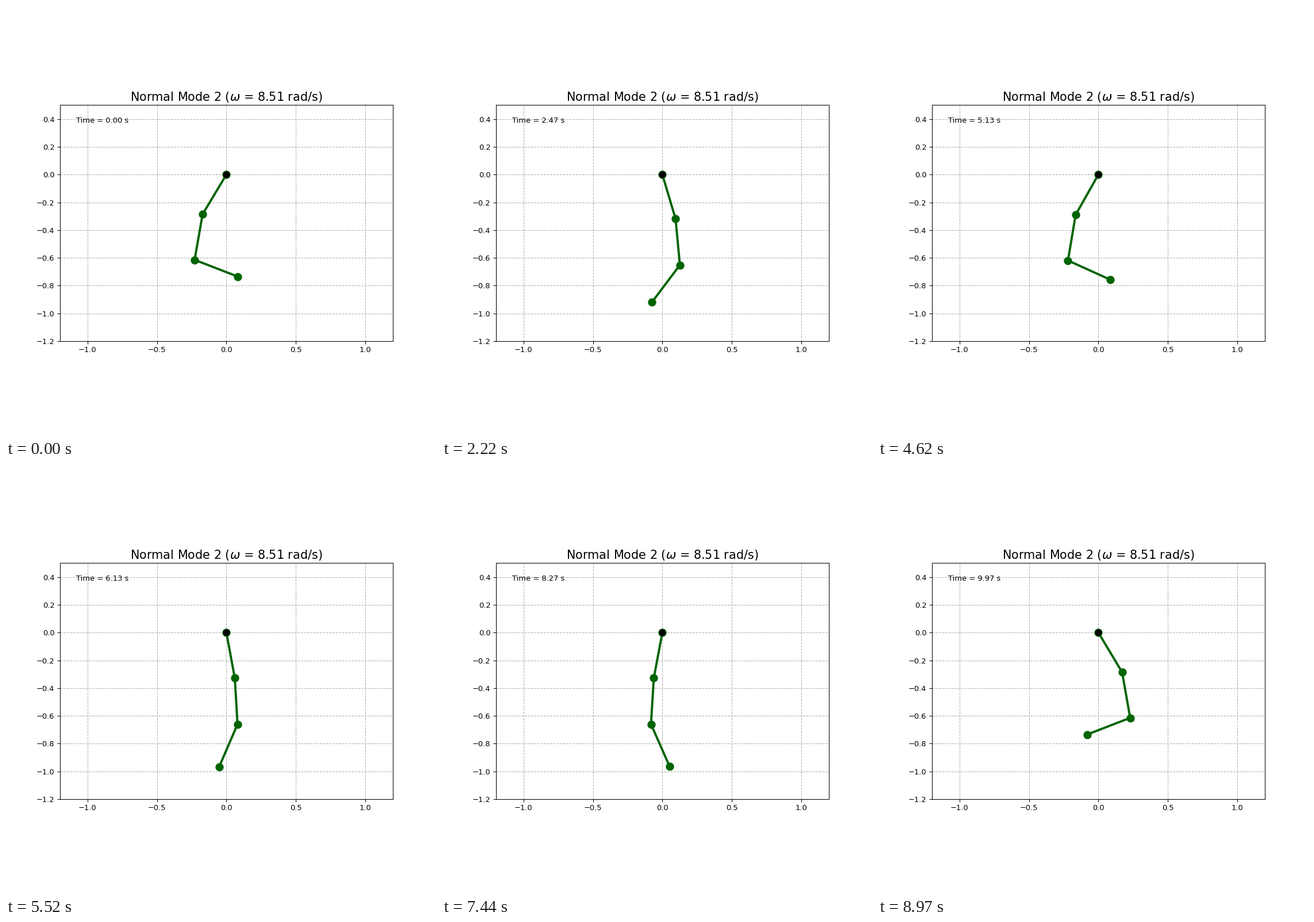
A matplotlib script for the animation above (9 s loop, 748x748 px).

```python
import numpy as np
import matplotlib.pyplot as plt
from matplotlib.animation import FuncAnimation

FPS = 30
FRAMES = 300
LENGTH = 1 / 3
OMEGA = 8.508
AMPLITUDE = np.array([-0.5393, -0.1743, 1.2018])

fig, ax = plt.subplots(figsize=(8, 8), dpi=93.5)
ax.set_aspect("equal")
ax.set_xlim(-1.2, 1.2)
ax.set_ylim(-1.2, 0.5)
ax.set_xticks(np.arange(-1, 1.1, 0.5))
ax.set_yticks(np.arange(-6, 3) * 0.2)
ax.grid(True, linestyle="--")
ax.set_title(rf"Normal Mode 2 ($\omega$ = {OMEGA:.2f} rad/s)", fontsize=16)

chain, = ax.plot([], [], "o-", color="darkgreen", lw=3, markersize=10)
ax.plot(0, 0, "ko", markersize=8)
clock = ax.text(0.05, 0.95, "", transform=ax.transAxes, va="top")


def joints(t):
    """Pivot and joint positions of the three-link chain at time t."""
    theta = AMPLITUDE * np.cos(OMEGA * t)
    x = np.cumsum(LENGTH * np.sin(theta))
    y = np.cumsum(-LENGTH * np.cos(theta))
    return np.append(0, x), np.append(0, y)


def update(i):
    t = i / FPS
    chain.set_data(*joints(t))
    clock.set_text(f"Time = {t:.2f} s")
    return chain, clock


anim = FuncAnimation(fig, update, frames=FRAMES, interval=30, repeat=True)
plt.show()
```
